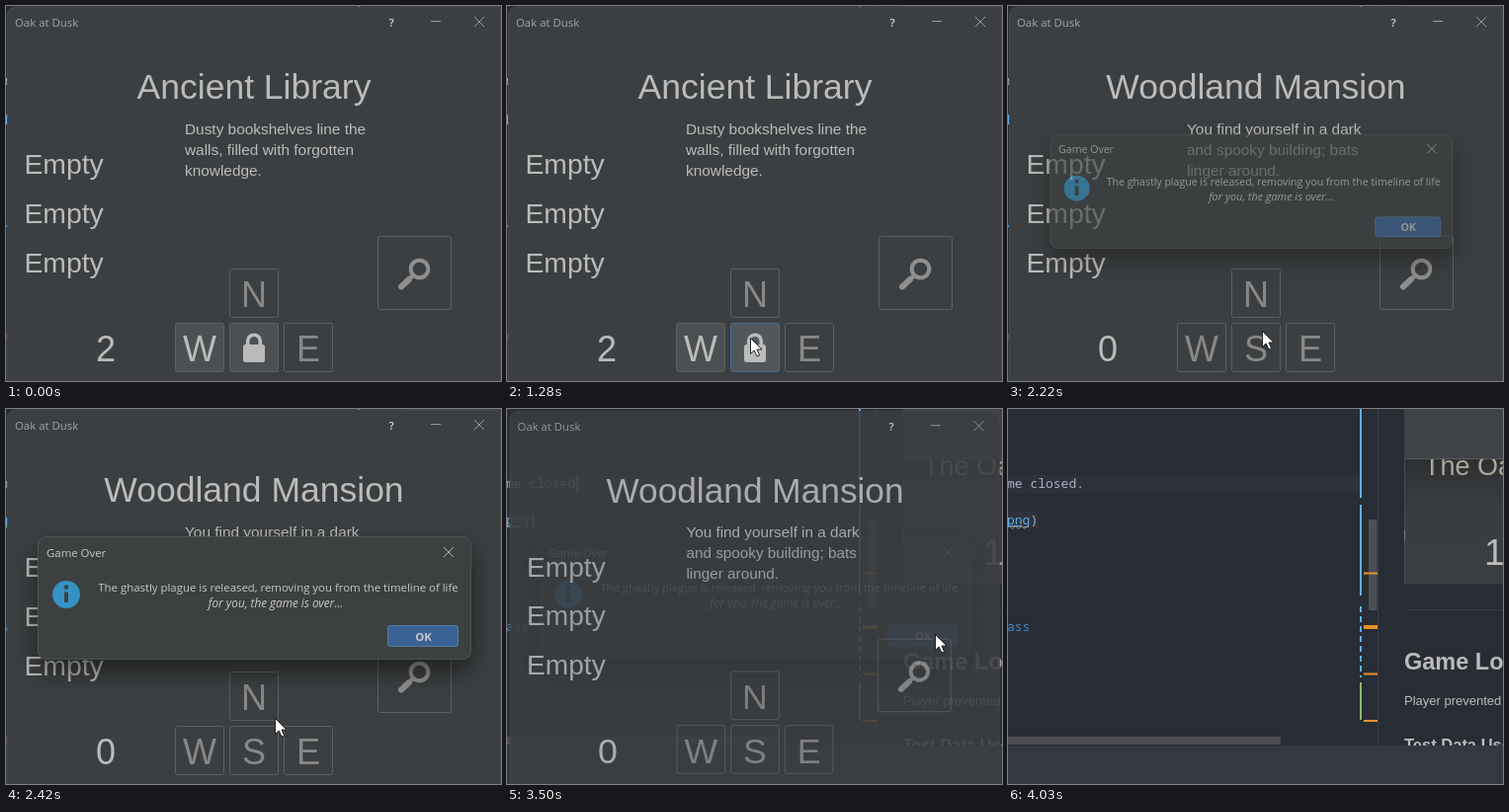
Animation, 501 px wide and 380 px high, one loop 4.23 s. Source, as an HTML page:

```html
<!DOCTYPE html>
<html lang="en">
<head>
<meta charset="utf-8">
<title>Oak at Dusk</title>
<style>
  html, body { margin: 0; width: 100%; height: 100%; overflow: hidden; background: #282c34; }
  svg { display: block; width: 501px; height: 380px; }
  text { font-family: "Liberation Sans", Arial, sans-serif; fill: #bbb; white-space: pre; }
  .ui { font-family: "Open Sans", "Noto Sans", sans-serif; font-size: 11.4px; }
  .code { font-family: "Noto Sans Mono", "DejaVu Sans Mono", monospace; font-size: 13px; fill: #abb2bf; }
  .mid { text-anchor: middle; }
  .title { font-size: 35.5px; }
  .story { font-size: 15.4px; }
  .slot { font-size: 28.3px; }
  .big { font-size: 36px; }
  .key rect { fill: #3c3f41; stroke: #5e6060; }
  .key text { fill: #888; }
  .key.on rect { fill: #4c5052; }
  .key.on text { fill: #bbb; }
  .key.hot rect { fill: #52575a; stroke: #466d94; }
  .line { fill: none; stroke: #9a9d9f; }
  .active .line { stroke: #e4e4e4; }
  #dialog text { fill: #c6c6c6; }
</style>
</head>
<body>
<svg viewBox="0 0 501 380">
  <defs>
    <linearGradient id="shade" x2="0" y2="1">
      <stop stop-color="#2d2f31"/><stop offset=".35" stop-color="#393c3e"/><stop offset="1" stop-color="#3c3f41"/>
    </linearGradient>
    <filter id="shadow" x="-20%" y="-40%" width="140%" height="200%">
      <feDropShadow dx="0" dy="12" stdDeviation="13" flood-opacity=".5"/>
    </filter>
  </defs>

  <!-- editor -->
  <g id="editor">
    <rect width="501" height="380" fill="#282c34"/>
    <rect y="67" width="356" height="18" fill="#2c313c"/>
    <text class="code" x="-1" y="80">me closed.</text>
    <rect id="caret" x="70" y="67" width="2" height="18" fill="#528bff"/>
    <rect y="104" width="31" height="17" fill="#2e323a"/>
    <text class="code" x="-1" y="117"><tspan fill="#61afef" text-decoration="underline">png</tspan>)</text>
    <path d="M0 120q1.5-3 3 0t3 0 3 0 3 0 3 0 3 0 3 0" fill="none" stroke="#b0a67c" stroke-width=".8"/>
    <text class="code" x="-1" y="225" style="fill:#4389c6">ass</text>
    <rect x="365" y="112" width="8.5" height="92" fill="#4b4f56"/>
    <rect y="332" width="276" height="8" fill="#4c4e52"/>
    <g stroke-width="2">
      <path d="M357 0V90M357 97V189" stroke="#61afef"/>
      <path d="M357 200V272" stroke="#61afef" stroke-dasharray="6 4"/>
      <path d="M357 277V315" stroke="#8fb573"/>
      <path d="M360 166.5H374M360 220H374M360 222H374M360 268.5H374M360 316H374" stroke="#e5932b"/>
    </g>
    <path d="M374.5 0V341" stroke="#3b404a"/>
    <rect x="401" y="51" width="100" height="126" fill="url(#shade)"/>
    <text x="421" y="67" font-size="27" style="fill:#aaa99c">The Oak</text>
    <rect x="401" width="100" height="50" fill="#3f4345"/>
    <path d="M401 50.5H501" stroke="#5a5d5e"/>
    <path d="M401.5 51V177" stroke="#4b4e50"/>
    <path d="M401.5 122V133" stroke="#777b7d"/>
    <text x="482" y="158" font-size="37">1</text>
    <path d="M401 203.5H501" stroke="#343942"/>
    <text x="401" y="264" font-size="23.5" font-weight="700">Game Lost</text>
    <text x="401" y="300" font-size="13">Player prevented</text>
    <text x="401" y="346" font-size="16.5" font-weight="700">Test Data Used</text>
    <rect y="341" width="501" height="39" fill="#333842"/>
  </g>

  <!-- game window -->
  <g id="game">
    <rect x="1.5" y="1" width="499" height="390" rx="8" fill="#3c3f41" stroke="#45484a"/>
    <text class="ui" x="9" y="21" style="fill:#a2a5a7">Oak at Dusk</text>
    <text class="ui mid" x="390" y="21" font-weight="600" style="fill:#d5d5d5">?</text>
    <path class="line" d="M430 15.5H440M474 11L484 21M484 11L474 21"/>
    <text class="title mid" id="place" x="251" y="94"></text>
    <g id="story"></g>
    <g id="slots"></g>
    <text class="big mid" id="count" x="101" y="360"></text>
    <g id="keys"></g>
    <rect x="376.5" y="233.5" width="74" height="74" rx="2" fill="#3c3f41" stroke="#5e6060"/>
    <g fill="none" stroke="#8f8f8f" stroke-linecap="round">
      <circle cx="418.5" cy="266.5" r="8.8" stroke-width="4"/>
      <path d="M412 273L408 277" stroke-width="4"/>
      <path d="M408 277L400 284.500" stroke-width="6"/>
    </g>
    <g id="lock">
      <rect x="240" y="343" width="22" height="18" rx="2.5" fill="#bbb"/>
      <path d="M244.700 344V339.500a6.300 6.300 0 0 1 12.600 0V344" fill="none" stroke="#bbb" stroke-width="3.600"/>
    </g>
  </g>

  <!-- message box -->
  <g id="dialog">
    <rect x="32.500" y="129.500" width="438" height="124" rx="8" fill="#3c3f41" stroke="#505355" filter="url(#shadow)"/>
    <text class="ui" x="41" y="150">Game Over</text>
    <path d="M443 140L453 150M453 140L443 150" fill="none" stroke="#bbb"/>
    <circle cx="61" cy="188" r="14" fill="#3592c4"/>
    <path d="M61 185.500V196" fill="none" stroke="#3c3f41" stroke-width="4"/>
    <circle cx="61" cy="180.500" r="2.200" fill="#3c3f41"/>
    <text class="ui mid" x="275.500" y="185">The ghastly plague is released, removing you from the timeline of life</text>
    <text class="ui mid" x="273" y="201" font-style="italic" style="font-size:11.8px">for you, the game is over...</text>
    <rect x="386.500" y="219.500" width="71" height="21" rx="2.500" fill="#3b6294" stroke="#527da6"/>
    <text class="ui mid" x="422.500" y="234.500" font-weight="700">OK</text>
  </g>

  <path id="cursor" d="M.5.5V16.500L4.200 13L7 19L9.600 18L7 12H12Z" fill="#fff" stroke="#111" stroke-width=".9"/>
</svg>
<script>
const LOOP = 4230, TICK = 67;
const $ = id => document.getElementById(id);
const rooms = {
  library: ["Ancient Library", ["Dusty bookshelves line the", "walls, filled with forgotten", "knowledge."]],
  mansion: ["Woodland Mansion", ["You find yourself in a dark", "and spooky building; bats", "linger around."]]
};
const scenes = [
  { time: 0, room: "library", moves: 2, enabled: "WS", hot: "" },
  { time: 1210, room: "library", moves: 2, enabled: "WS", hot: "S" },
  { time: 1480, room: "mansion", moves: 1, enabled: "WSE", hot: "S" },
  { time: 2080, room: "mansion", moves: 0, enabled: "", hot: "" }
];

// each sweep follows a quadratic curve: begin, bend, finish
const sweeps = [
  { time: 70, end: 410, curve: [[323, 337], [370, 265], [415, 265]] },
  { time: 810, end: 1280, curve: [[391, 248], [560, 208], [246, 336]] },
  { time: 1350, end: 1820, curve: [[243, 335], [235, 329], [240, 331]] },
  { time: 2080, end: 2550, curve: [[240, 331], [274, 333], [276, 295]] },
  { time: 2620, end: 2950, curve: [[300, 282], [400, 228], [433, 228]] },
  { time: 3830, end: 3970, curve: [[440, 256], [450, 300], [459, 336]] }
];

const latest = (list, t) => list.findLast(item => item.time <= t);
const show = (id, on) => { $(id).style.display = on ? "" : "none"; };
const lines = (texts, cls, x, y, gap) =>
  texts.map((s, i) => `<text class="${cls}" x="${x}" y="${y + i * gap}">${s}</text>`).join("");

// progress from 0 to 1 in whole ticks; lead counts ticks already done at the start
function progress(t, start, end, lead = 0) {
  const count = Math.round((end - start) / TICK);
  const step = Math.floor((t - start) / (end - start) * count + .1);
  return Math.max(0, Math.min(count, step) + lead) / (count + lead);
}

function place(id, opacity, scale, cx, cy, dx = 0, dy = 0) {
  $(id).setAttribute("opacity", opacity);
  $(id).setAttribute("transform", `translate(${cx + dx} ${cy + dy}) scale(${scale}) translate(${-cx} ${-cy})`);
}

const keys = [["N", 226, 266], ["W", 171, 321], ["S", 226, 321], ["E", 281, 321]];
$("keys").innerHTML = keys.map(([name, x, y]) =>
  `<g id="key${name}"><rect x="${x + .5}" y="${y + .5}" width="49" height="49" rx="2"/>` +
  `<text class="big mid" x="${x + 25}" y="${y + 39}">${name}</text></g>`).join("");
$("slots").innerHTML = lines(["Empty", "Empty", "Empty"], "slot", 18.5, 169.5, 50);

let current;
function setScene(scene) {
  if (scene === current) return;
  current = scene;
  const [name, story] = rooms[scene.room];
  const locked = scene.room === "library";
  $("place").textContent = name;
  $("story").innerHTML = lines(story, "story", 181, 130, 21);
  $("count").textContent = scene.moves;
  for (const [key] of keys) {
    const { classList } = $("key" + key);
    classList.value = "key";
    classList.toggle("on", scene.enabled.includes(key));
    classList.toggle("hot", scene.hot === key);
  }
  show("lock", locked);
  $("keyS").lastChild.style.display = locked ? "none" : "";
}

function drawWindows(t) {
  const left = 1 - progress(t, 2150, 2420, 1);
  const opened = 1 - left * left;
  const closed = progress(t, 3500, 3630, 1);
  const shrink = 1 - .06 * closed * closed;
  place("game", 1 - closed * closed, shrink, 250.5, 190);
  place("dialog", t < 2150 ? 0 : opened * (1 - closed) ** 5, (.8 + .2 * opened) * shrink,
    251.5, 191.5, -14 * (1 - opened), -10 * (1 - opened));
}

function drawCursor(t) {
  const sweep = latest(sweeps, t);
  const visible = sweep && t < 4030;
  show("cursor", visible);
  if (!visible) return;
  const p = progress(t, sweep.time, sweep.end), q = 1 - p;
  const [a, b, c] = sweep.curve;
  const [x, y] = [0, 1].map(i => Math.round(q * q * a[i] + 2 * p * q * b[i] + p * p * c[i]));
  $("cursor").setAttribute("transform", `translate(${x} ${y})`);
}

function draw(t) {
  setScene(latest(scenes, t));
  $("game").classList.toggle("active", t >= 1350 && t < 2150);
  show("caret", t >= 3500 && t < 3900);
  drawWindows(t);
  drawCursor(t);
}

const start = performance.now();
function tick() {
  draw((performance.now() - start) % LOOP);
  requestAnimationFrame(tick);
}
tick();
</script>
</body>
</html>
```
